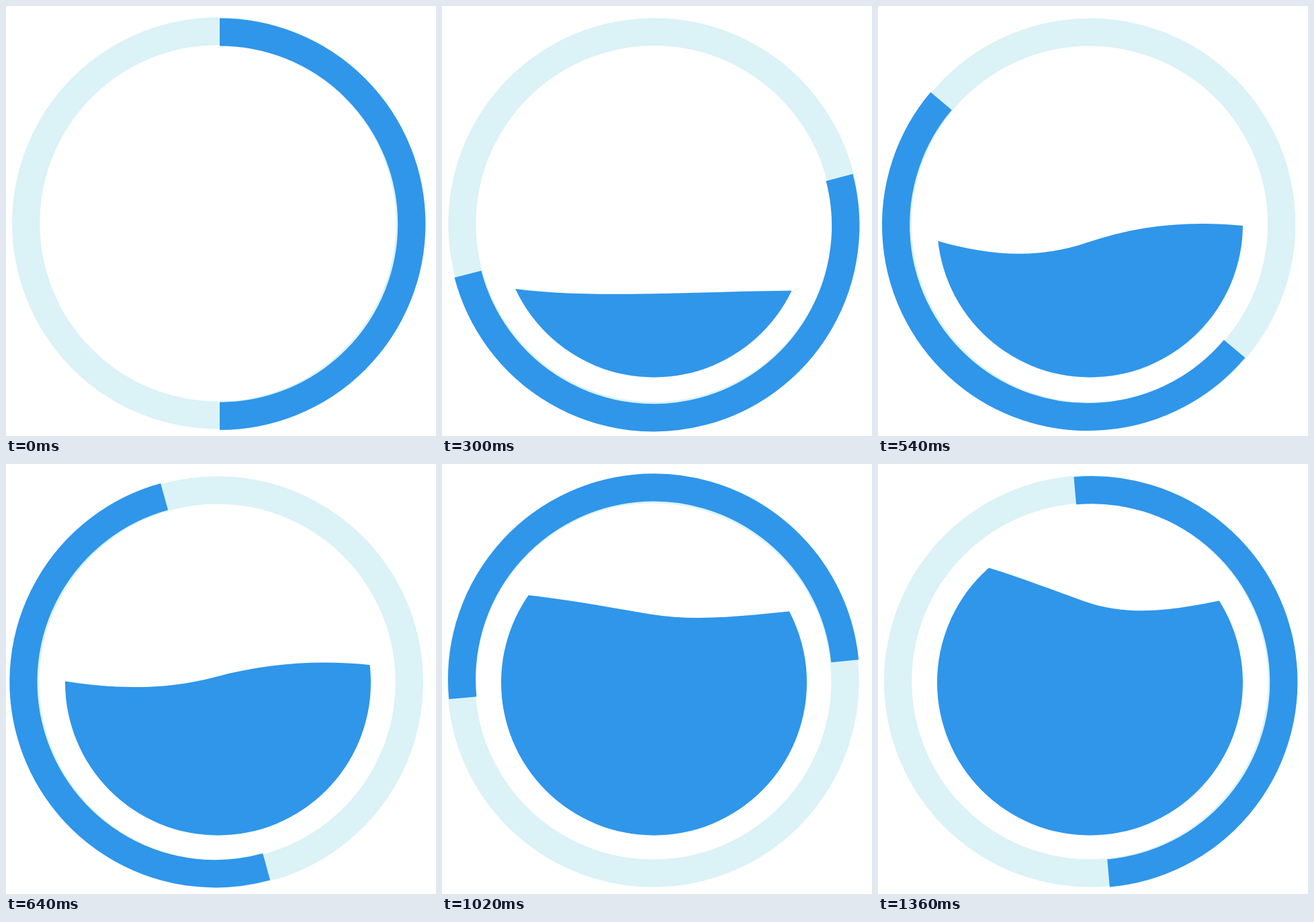
These frames come from a looping animation (640 px wide and 640 px high, 1670 ms). An HTML page with a canvas:

```html
<!DOCTYPE html>
<html lang="en">
<head>
<meta charset="utf-8">
<title>Filling water loader</title>
<style>
  html, body { margin: 0; width: 100%; height: 100%; overflow: hidden; background: #fff; }
  canvas { display: block; width: 640px; height: 640px; }
</style>
</head>
<body>
<canvas id="stage" width="640" height="640"></canvas>
<script>
const ctx = document.getElementById('stage').getContext('2d');
const LOOP = 1670, STEP = 20, END = 1360;
const BLUE = '#2f96ea', PALE = '#dbf2f7';
const LEFT = 88, RIGHT = 543, RISE = 90;

// Key shapes of the water surface: [x, y, slope] at each anchor
const rolling  = [[LEFT, 460.5, -.10], [285, 469, .40],  [RIGHT, 492, -.10]];
const swinging = [[LEFT, 375.5, .42],  [308, 388, -.42], [RIGHT, 355, .10]];
const settling = [[LEFT, 276.4, -.08], [315, 253, -.13], [RIGHT, 249, .11]];
const full     = [[LEFT, 135.5, .18],  [306, 204, .36],  [RIGHT, 196, -.21]];

const clamp = u => Math.min(1, Math.max(0, u));
const progress = (t, from, to) => clamp((t - from) / (to - from));
const easeOut = u => 1 - (1 - u) ** 2;
const mix = (a, b, u) =>
  a.map((anchor, i) => anchor.map((v, j) => v + (b[i][j] - v) * u));

function surfaceAt(t) {
  if (t < 160) {
    const drop = RISE * (1 - t / 160);
    return rolling.map(([x, y, slope]) => [x, y + drop, slope]);
  }
  if (t < 440) return mix(rolling, swinging, progress(t, 160, 440));
  if (t < 820) return mix(swinging, settling, progress(t, 440, 820));
  return mix(settling, full, easeOut(progress(t, 820, END)));
}

// Steady turn, held back by a pulse that swells and then fades
function angleAt(t) {
  const u = clamp(t / END);
  const pulse = Math.sin(Math.PI * (t - 260) / 380) ** 2;
  const drag = 220 * u ** 1.5 * (1 - u) ** 2.5 * pulse;
  return 355 * u - 2.5 * Math.sin(Math.PI * u) - drag;
}

function band(x, y, color, from, to) {
  ctx.beginPath();
  ctx.arc(x, y, 285.7, from, to);
  ctx.lineWidth = 41.2;
  ctx.strokeStyle = color;
  ctx.stroke();
}

// Both bands sit slightly off the pivot, so the ring wobbles as it turns
function drawRing(angle) {
  ctx.save();
  ctx.translate(314.9, 323.9);
  ctx.rotate(angle * Math.PI / 180);
  band(.5, -.6, PALE, 0, Math.PI * 2);
  band(3.2, .7, BLUE, -Math.PI / 2, Math.PI / 2);
  ctx.restore();
}

function curve([x0, y0, s0], [x1, y1, s1]) {
  const d = (x1 - x0) / 3;
  ctx.bezierCurveTo(x0 + d, y0 + s0 * d, x1 - d, y1 - s1 * d, x1, y1);
}

function drawWater([left, middle, right]) {
  ctx.save();
  ctx.beginPath();
  ctx.arc(315.5, 325.2, 227.5, 0, Math.PI * 2);
  ctx.clip();
  ctx.beginPath();
  ctx.moveTo(LEFT - 10, left[1]);
  ctx.lineTo(LEFT, left[1]);
  curve(left, middle);
  curve(middle, right);
  ctx.lineTo(RIGHT + 10, right[1]);
  ctx.lineTo(RIGHT + 10, 640);
  ctx.lineTo(LEFT - 10, 640);
  ctx.closePath();
  ctx.fillStyle = BLUE;
  ctx.fill();
  ctx.restore();
}

function draw(now) {
  const t = Math.floor((now % LOOP) / STEP) * STEP;
  ctx.fillStyle = '#fff';
  ctx.fillRect(0, 0, 640, 640);
  drawRing(angleAt(Math.min(t, END)));
  drawWater(surfaceAt(t));
}

const start = performance.now();
function tick() {
  draw(performance.now() - start);
  requestAnimationFrame(tick);
}
tick();
</script>
</body>
</html>
```
